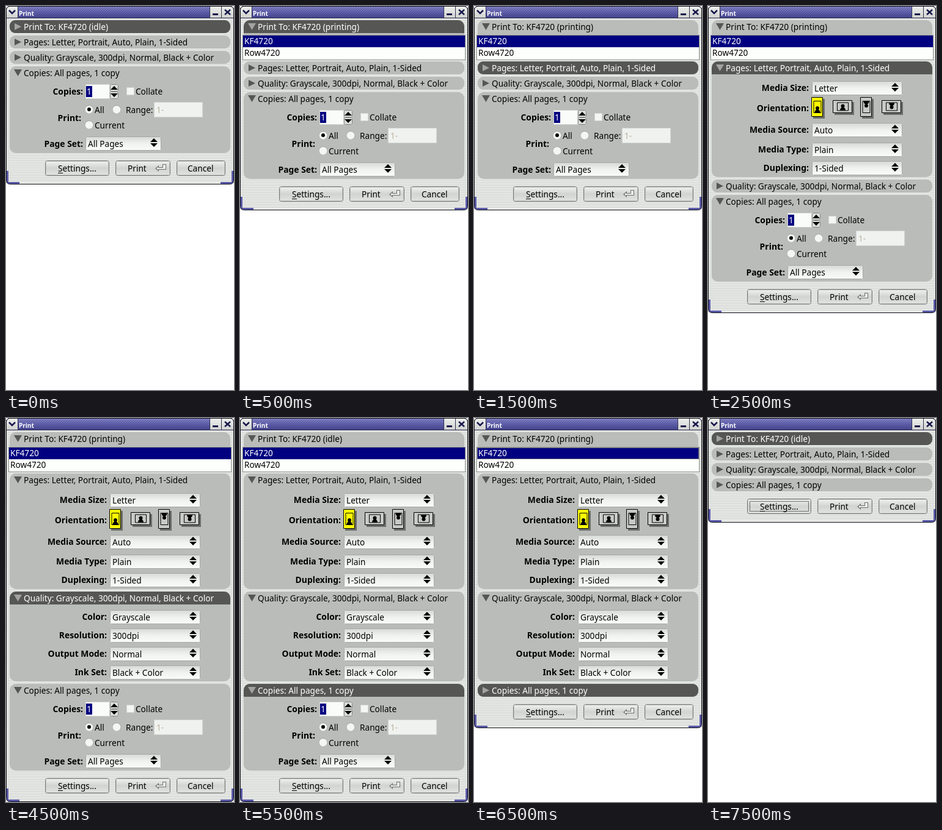
Animation of 373x624 px, one loop 8000 ms. Source, as an HTML page with a canvas:

```html
<!DOCTYPE html>
<html lang="en">
<head>
<meta charset="utf-8">
<title>Print dialog</title>
<style>
html, body { margin: 0; width: 100%; height: 100%; overflow: hidden; background: #fff; }
canvas { display: block; }
</style>
</head>
<body>
<canvas id="stage" width="373" height="624"></canvas>
<script>
const g = document.getElementById('stage').getContext('2d');
const INK = '#000', PANEL = '#babcb9', DARK = '#565755', NAVY = '#000080', BLUE = '#5858a8';
const PRINTER = 'KF4720', SPARE = 'Row4720';
const LOOP = 8000, FIRST = 500, STEP = 1000;

// Open sections (printer, pages, quality, copies), highlighted section, printer status, focus.
const states = [
  ['0001', 0, 'idle'],
  ['1001', 0, 'printing'],
  ['1001', 1, 'printing'],
  ['1101', 1, 'printing'],
  ['1101', 2, 'printing'],
  ['1111', 2, 'printing'],
  ['1111', 3, 'idle'],
  ['1110', 3, 'printing', 'list'],
  ['0000', 0, 'idle', 'settings'],
];

function rect(x, y, w, h, fill, r = 0) {
  g.fillStyle = fill;
  g.beginPath();
  g.roundRect(x, y, w, h, r);
  g.fill();
}

function frame(x, y, w, h, color, r = 0) {
  g.strokeStyle = color;
  g.lineWidth = 1;
  g.beginPath();
  g.roundRect(x + .5, y + .5, w - 1, h - 1, r);
  g.stroke();
}

function fade(y, h, ...colors) {
  const grad = g.createLinearGradient(0, y, 0, y + h);
  colors.forEach((c, i) => grad.addColorStop(i / (colors.length - 1), c));
  return grad;
}

function poly(fill, ...points) {
  g.fillStyle = fill;
  g.beginPath();
  for (let i = 0; i < points.length; i += 2) g.lineTo(points[i], points[i + 1]);
  g.closePath();
  g.fill();
}

function disc(x, y, r, fill) {
  g.fillStyle = fill;
  g.beginPath();
  g.arc(x, y, r, 0, 7);
  g.fill();
}

function text(s, x, mid, color = INK, font = '13.65px') {
  g.font = font + ' "Noto Sans", sans-serif';
  g.fillStyle = color;
  g.fillText(s, x, mid + 5);
}

function label(s, right, mid) {
  g.textAlign = 'right';
  text(s, right, mid, INK, 'bold 13.9px');
  g.textAlign = 'left';
}

function dotted(x, y, w, h, color) {
  g.setLineDash([1, 1]);
  frame(x, y, w, h, color);
  g.setLineDash([]);
}

function arrows(x, mid, half, gap) {
  poly(INK, x - half, mid - gap, x + half, mid - gap, x, mid - gap - half);
  poly(INK, x - half, mid + gap, x + half, mid + gap, x, mid + gap + half);
}

function entry(x, y, w, h, fill) {
  rect(x, y, w, h, fill, 2);
  frame(x, y, w, h, '#d2d4d1', 2);
}

function dropdown(s, x, mid, w) {
  rect(x, mid - 11, w, 23, fade(mid - 11, 23, '#d6d8d5', '#f0f2ef', '#fafcf9'), 2);
  frame(x, mid - 11, w, 23, '#a6a8a5', 2);
  text(s, x + 4, mid + 1);
  arrows(x + w - 12, mid - 1, 6, 1);
}

function field(name, value, mid) {
  label(name, 165, mid);
  dropdown(value, 170, mid, 148);
}

function radio(x, y, on) {
  disc(x, y, 7, '#a4a6a3');
  disc(x, y + .3, 6.4, '#f4f6f3');
  if (on) disc(x, y, 3, INK);
}

function orientation(x, y, w, h, flipped, fill) {
  rect(x + 3, y + 3, w, h, '#6c6e6b');
  rect(x, y, w, h, fill);
  frame(x, y, w, h, INK);
  const iw = w > h ? 19 : 13, ih = w > h ? 14 : 20;
  g.save();
  g.translate(x + w / 2 + .5, y + h / 2);
  if (flipped) g.scale(1, -1);
  frame(-iw / 2, -ih / 2, iw, ih, INK);
  const floor = ih / 2 - 1;
  disc(0, floor - 7, 3, INK);
  g.beginPath();
  g.ellipse(0, floor, 4.5, 5, 0, Math.PI, 0);
  g.fill();
  g.restore();
}

function button(s, x, y, w, textX) {
  rect(x, y, w, 25, fade(y, 25, '#f2f4f1', '#d2d4d1', '#e2e4e1'), 3);
  frame(x, y, w, 25, '#777976', 3);
  frame(x + 1, y + 1, w - 2, 23, '#c4c6c3', 2);
  text(s, textX, y + 13);
}

function printerList(y, focused) {
  rect(4, y + 24, 365, 41, '#8e908d');
  rect(5, y + 25, 363, 39, '#fdfffc');
  rect(5, y + 25, 363, 19, NAVY);
  if (focused) dotted(5, y + 25, 363, 19, '#e8e880');
  text(PRINTER, 7, y + 34, '#fff');
  text(SPARE, 7, y + 53);
}

function pageOptions(y) {
  field('Media Size:', 'Letter', y + 43);
  label('Orientation:', 165, y + 76);
  const grey = '#c8cac7';
  orientation(169, y + 58, 19, 32, false, '#ffff00');
  orientation(204, y + 63, 32, 21, false, grey);
  orientation(249, y + 58, 19, 32, true, grey);
  orientation(284, y + 63, 32, 21, true, grey);
  field('Media Source:', 'Auto', y + 111);
  field('Media Type:', 'Plain', y + 143);
  field('Duplexing:', '1-Sided', y + 173);
}

function qualityOptions(y) {
  [['Color:', 'Grayscale'], ['Resolution:', '300dpi'],
   ['Output Mode:', 'Normal'], ['Ink Set:', 'Black + Color']]
    .forEach(([name, value], i) => field(name, value, y + 41 + 30 * i));
}

function copyOptions(y) {
  label('Copies:', 126, y + 41);
  entry(130, y + 29, 40, 24, '#fafcf9');
  rect(131, y + 32, 10, 18, NAVY);
  text('1', 132, y + 41, '#fff');
  for (const top of [29, 41]) {
    rect(170, y + top, 14, 12, '#dcdedb', 2);
    frame(170, y + top, 14, 12, '#858784', 2);
  }
  arrows(177, y + 41, 6, 3);
  entry(197, y + 34, 13, 13, '#f4f6f3');
  text('Collate', 212, y + 41);
  label('Print:', 123, y + 84);
  radio(136, y + 70, true);
  text('All', 145, y + 71);
  radio(181, y + 70);
  text('Range:', 196, y + 71);
  entry(242, y + 58, 80, 25, '#f0f2ef');
  text('1-', 246, y + 71, '#b9b19c');
  radio(136, y + 95);
  text('Current', 145, y + 96);
  label('Page Set:', 126, y + 126);
  dropdown('All Pages', 130, y + 125, 124);
}

const sections = [
  { title: s => `Print To: ${PRINTER} (${s})`, tall: 67, body: printerList },
  { title: () => 'Pages: Letter, Portrait, Auto, Plain, 1-Sided', tall: 192, body: pageOptions },
  { title: () => 'Quality: Grayscale, 300dpi, Normal, Black + Color', tall: 150, body: qualityOptions },
  { title: () => 'Copies: All pages, 1 copy', tall: 145, body: copyOptions },
];

function titleBar() {
  rect(0, 0, 373, 20, fade(0, 20, '#8a8acb', '#6262ae', '#44448c'));
  g.strokeStyle = 'rgba(40,40,110,.4)';
  g.lineWidth = 1;
  g.beginPath();
  for (let x = 0; x < 373; x += 4) {
    g.moveTo(x, 20);
    g.lineTo(x + 20, 0);
  }
  g.stroke();
  for (const [x, w] of [[1, 18], [334, 18], [353, 19]]) {
    rect(x - 1, 0, w + 2, 20, '#303050');
    rect(x, 1, w, 18, fade(1, 18, '#eef0ed', '#d0d2cf'));
  }
  g.strokeStyle = '#18184c';
  g.lineWidth = 2.5;
  g.beginPath();
  g.moveTo(5, 7); g.lineTo(10, 12); g.lineTo(15, 7);
  g.moveTo(358, 6); g.lineTo(367, 14);
  g.moveTo(367, 6); g.lineTo(358, 14);
  g.stroke();
  rect(338, 12, 9, 3, '#18184c');
  text('Print', 21, 11, '#fff', 'bold 10px');
  rect(0, 19, 373, 1, '#28284c');
}

function shell(h) {
  rect(0, 0, 373, h, '#dcdfdc');
  for (let y = 20; y < h; y += 4) rect(0, y, 373, 2, '#e4e6e3');
  titleBar();
  rect(1, h - 4, 371, 3, '#e6e8e5');
  for (const [side, foot] of [[1, 3], [369, 351]]) {
    rect(side, h - 22, 3, 20, BLUE);
    rect(foot, h - 4, 19, 3, BLUE);
  }
}

function section({ title, tall, body }, y, open, active, status, focus) {
  const h = open ? tall - 4 : 21;
  rect(6, y, 361, h, PANEL, open ? 10 : 9);
  if (active) rect(6, y, 361, 21, DARK, open ? [10, 10, 0, 0] : 9);
  const tint = active ? '#a2a4a1' : DARK;
  if (open) poly(tint, 13, y + 5, 26, y + 5, 19.5, y + 16);
  else poly(tint, 14, y + 5, 25, y + 10.5, 14, y + 16);
  text(title(status), 29, y + 11, active ? '#fff' : INK);
  if (open) body(y, focus === 'list');
}

function buttons(y, focus) {
  button('Settings...', 64, y, 105, 85);
  rect(85, y + 20, 8, 1, INK);
  if (focus === 'settings') dotted(68, y + 4, 97, 17, INK);
  button('Print', 179, y, 90, 199);
  button('Cancel', 279, y, 80, 297);
  // Return key arrow
  poly('#70726f', 244, y + 13, 250, y + 8, 250, y + 11, 256, y + 11, 256, y + 6,
    262, y + 6, 262, y + 15, 250, y + 15, 250, y + 18);
  poly('#eceeeb', 246, y + 13, 249, y + 10.5, 249, y + 12, 257, y + 12, 257, y + 7,
    261, y + 7, 261, y + 14, 249, y + 14, 249, y + 15.5);
}

function draw([open, active, status, focus]) {
  const pitch = i => open[i] === '1' ? sections[i].tall : 25;
  const end = sections.reduce((y, _, i) => y + pitch(i), 23);
  const h = end + 47;
  rect(0, 0, 373, 624, '#fff');
  g.save();
  g.beginPath();
  g.roundRect(0, 0, 373, h, 6);
  g.clip();
  shell(h);
  let y = 23;
  sections.forEach((s, i) => {
    section(s, y, open[i] === '1', i === active, status, focus);
    y += pitch(i);
  });
  buttons(end + 8, focus);
  g.restore();
  frame(0, 0, 373, h, '#101018', 6);
}

const start = performance.now();
function tick() {
  const t = (performance.now() - start) % LOOP;
  draw(states[t < FIRST ? 0 : 1 + Math.floor((t - FIRST) / STEP)]);
  requestAnimationFrame(tick);
}
tick();
</script>
</body>
</html>
```
